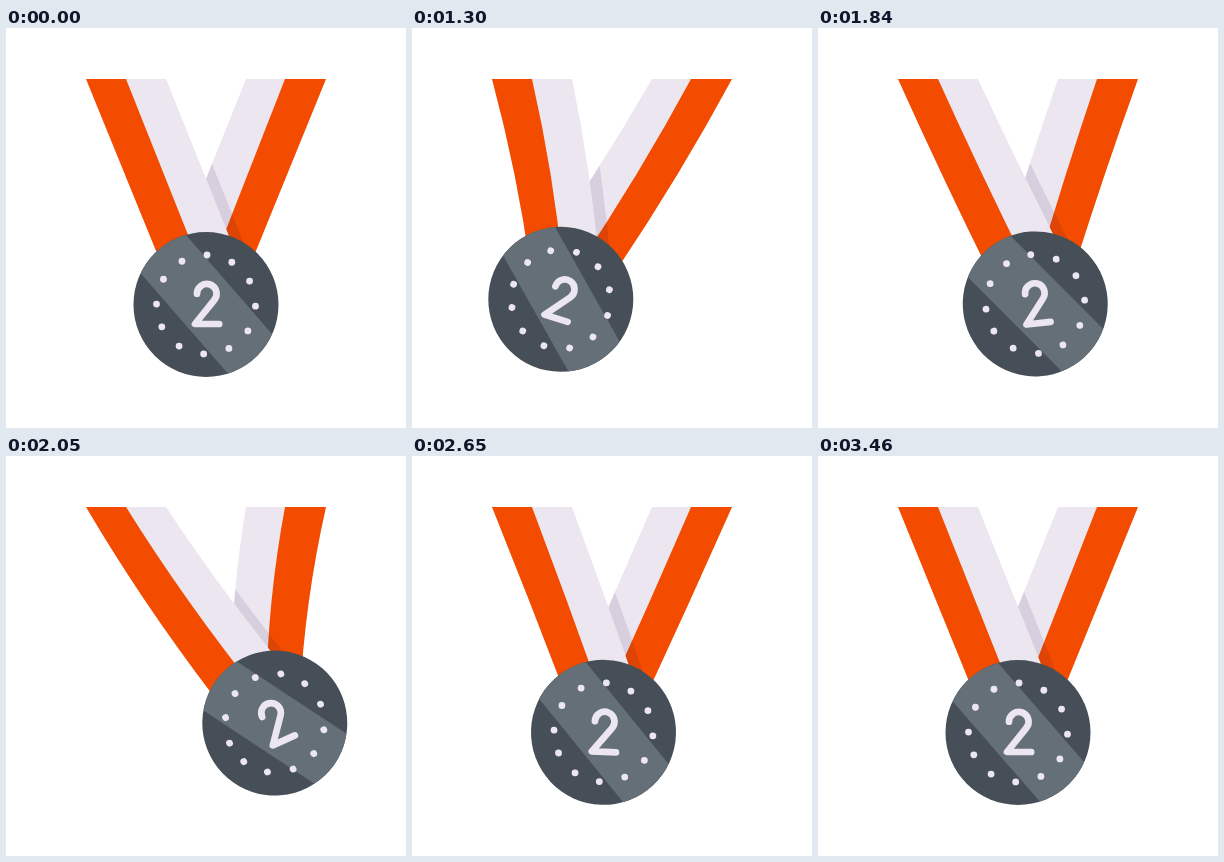
An HTML page with a canvas that plays this animation: 400x400 px, repeating every 3520 ms.

```html
<!DOCTYPE html>
<html lang="en">
<head>
<meta charset="utf-8">
<title>Swinging medal</title>
<style>
  html, body { margin: 0; width: 100%; height: 100%; overflow: hidden; background: #fff; }
  canvas { display: block; width: 400px; height: 400px; }
</style>
</head>
<body>
<canvas id="stage" width="400" height="400"></canvas>
<script>
const ctx = document.getElementById('stage').getContext('2d');
const LOOP = 3520, STEP = 30;
const ORANGE = '#f34c00', PALE = '#ebe6f0', DARK = '#464f58', SHINE = '#656f78';
const SHADE = 'rgba(40, 0, 60, .1)';
const PIVOT_Y = 21, ROPE = 255.5, RADIUS = 72.5;
const TOP = 51, BOTTOM = 240, BOW = .12;
const rad = deg => deg * Math.PI / 180;

// Keys: step, swing of the medal, additional turn of its face (degrees), pinch of the ribbons (px)
const keys = [
  [33, 0, 0, 0], [51.5, 15.4, 7.6, .5], [66, -16.5, -9.2, -2],
  [82, 4.04, .5, 3.6], [98, -2.7, -.3, 3], [115, 0, 0, 0],
];
const smooth = u => u * u * (3 - 2 * u);
const eases = [u => Math.sin(u * Math.PI / 2), u => smooth(u ** 1.33), smooth, smooth, smooth];

// Ribbon edges from the outside in: top x, bottom x, how far the bottom follows the medal and the pinch
const leftRibbon = [[80, 157, .76, 1], [120, 195.2, .87, .4], [160, 235.8, .95, 0]];
const rightRibbon = [[320, 243, .72, -.8], [279, 205, .78, -.9], [240, 164.2, .88, 0]];

function pose(step) {
  if (step <= keys[0][0] || step >= keys[5][0]) return [0, 0, 0];
  const i = keys.findIndex(key => key[0] > step) - 1;
  const [a, b] = [keys[i], keys[i + 1]];
  const k = eases[i]((step - a[0]) / (b[0] - a[0]));
  return [1, 2, 3].map(j => a[j] + (b[j] - a[j]) * k);
}

// Closed strip between two bowed edges
function strip(a, b, shift, pinch) {
  const curve = ([top, bottom, follow, squeeze]) => {
    const x = bottom + follow * shift + squeeze * pinch;
    return [top, (top + x) / 2 - BOW * shift, x];
  };
  const [a0, a1, a2] = curve(a), [b0, b1, b2] = curve(b), middle = (TOP + BOTTOM) / 2;
  const path = new Path2D();
  path.moveTo(a0, TOP);
  path.quadraticCurveTo(a1, middle, a2, BOTTOM);
  path.lineTo(b2, BOTTOM);
  path.quadraticCurveTo(b1, middle, b0, TOP);
  path.closePath();
  return path;
}

function fill(path, color) {
  ctx.fillStyle = color;
  ctx.fill(path);
}

function drawRibbon([outer, inner, edge], shift, pinch) {
  fill(strip(outer, edge, shift, pinch), PALE);
  fill(strip(outer, inner, shift, pinch), ORANGE);
}

function drawRibbons(shift, pinch) {
  drawRibbon(rightRibbon, shift, pinch);
  const [top, bottom, ...pull] = leftRibbon[2];
  ctx.save();
  ctx.clip(strip(rightRibbon[0], rightRibbon[2], shift, pinch));
  fill(strip(leftRibbon[2], [top + 12, bottom + 12, ...pull], shift, pinch), SHADE);
  ctx.restore();
  drawRibbon(leftRibbon, shift, pinch);
}

function disc(x, y, r) {
  const path = new Path2D();
  path.arc(x, y, r, 0, 2 * Math.PI);
  return path;
}

const body = disc(0, 0, RADIUS);
const digit = new Path2D('M-9-10.8A9.8 9.8 0 1 1 8.3-4.5L-11 19.5H13.2');

function drawMedal(swing, turn) {
  ctx.save();
  ctx.translate(200, PIVOT_Y);
  ctx.rotate(rad(swing));
  ctx.translate(0, ROPE);
  fill(body, DARK);

  ctx.save();
  ctx.clip(body);
  ctx.rotate(rad(49));
  ctx.fillStyle = SHINE;
  ctx.fillRect(-80, -30.5, 160, 59.3);
  ctx.restore();

  ctx.rotate(rad(turn));
  for (let i = -3; i < 9; i++) {
    const angle = rad(1.2 + 30.25 * i);
    fill(disc(49.5 * Math.sin(angle), -49.5 * Math.cos(angle), 3.4), PALE);
  }
  ctx.strokeStyle = PALE;
  ctx.lineWidth = 6.7;
  ctx.lineCap = ctx.lineJoin = 'round';
  ctx.stroke(digit);
  ctx.restore();
}

function draw(now) {
  const step = Math.floor((now % LOOP - 10) / STEP + 1e-6);
  const [swing, turn, pinch] = pose(step);
  ctx.clearRect(0, 0, 400, 400);
  drawRibbons(-ROPE * Math.sin(rad(swing)), pinch);
  drawMedal(swing, turn);
}

let start;
function tick(now) {
  start ??= now;
  draw(now - start);
  requestAnimationFrame(tick);
}
draw(0);
requestAnimationFrame(tick);
</script>
</body>
</html>
```
